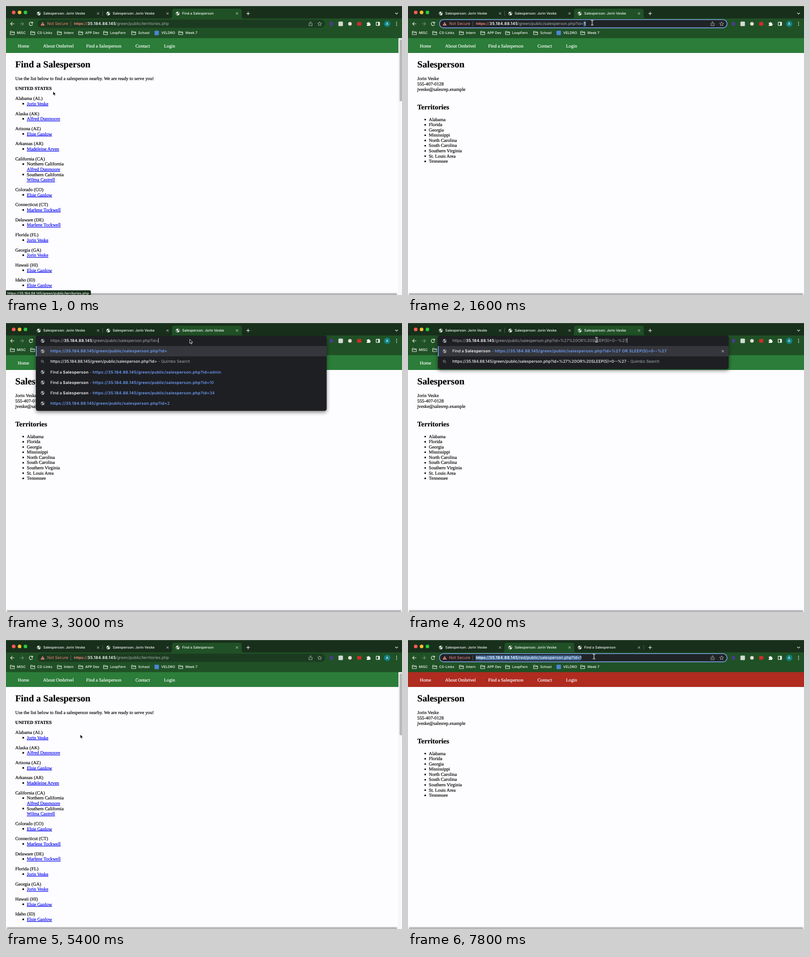
An HTML page for the animation above (8 s loop, 875 px wide and 640 px high).

```html
<!DOCTYPE html>
<html lang="en">
<head>
<meta charset="utf-8">
<title>Find a Salesperson</title>
<style>
html, body { margin: 0; width: 100%; height: 100%; overflow: hidden; background: #fdfcfe; }
svg { display: block; width: 875px; height: 640px; }
text { white-space: pre; text-rendering: geometricPrecision; }
.ui { font: 500 7.65px Inter, Roboto, sans-serif; fill: #f4f7f4; }
.url { font: 400 8.8px Inter, Roboto, sans-serif; fill: #a5ada8; letter-spacing: 0; }
.page { font: 10.3px "Liberation Serif", "Times New Roman", serif; fill: #000; stroke: #000; stroke-width: .2px; }
.h1 { font-size: 20.6px; font-weight: 700; }
.h2 { font-size: 15.4px; font-weight: 700; }
.bold { font-weight: 700; }
.nav { fill: #fff; stroke: #fff; }
.link { fill: #0000ee; stroke: #0000ee; text-decoration: underline; }
.white { fill: #f1f3f4; font-weight: 500; }
.strong { font-weight: 600; fill: #fff; letter-spacing: .34px; }
.hit { font-weight: 600; fill: #6f9ef8; letter-spacing: .34px; }
.blue { fill: #6f9ef8; }
.warn { fill: #ee8378; }
.line { fill: none; stroke: #e9efe9; stroke-width: 1.2; }
.drop { filter: drop-shadow(0 3px 4px rgba(0, 0, 0, .5)); }
</style>
</head>
<body>
<svg id="stage" viewBox="0 0 875 640"></svg>
<script>
const LOOP = 8000, STEP = 200, LINE = 11.57, GAP = 10.27;
const stage = document.getElementById("stage");

const HOST = "35.184.88.145";
const LIST = "/green/public/territories.php";
const PERSON = "/green/public/salesperson.php?id=";
const ATTACK = "%27%20OR%20SLEEP(5)=0--%27";

const JORIN = "Jorin Veske", ALFRED = "Alfred Dunmoore", ELSIE = "Elsie Ganlow";
const MADELEINE = "Madeleine Arven", WILMA = "Wilma Castrell", MARLENE = "Marlene Tockwell";
const STATES = [
  ["Alabama (AL)", JORIN], ["Alaska (AK)", ALFRED], ["Arizona (AZ)", ELSIE],
  ["Arkansas (AR)", MADELEINE],
  ["California (CA)", "-Northern California", ALFRED, "-Southern California", WILMA],
  ["Colorado (CO)", ELSIE], ["Connecticut (CT)", MARLENE], ["Delaware (DE)", MARLENE],
  ["Florida (FL)", JORIN], ["Georgia (GA)", JORIN], ["Hawaii (HI)", ELSIE], ["Idaho (ID)", ELSIE]
];
const TERRITORIES = ["Alabama", "Florida", "Georgia", "Mississippi", "North Carolina",
  "South Carolina", "Southern Virginia", "St. Louis Area", "Tennessee"];

// time, x, y, shape
const POINTER = [
  [0, 104, 189, "arrow"], [200, 99, 198, "arrow"], [400, 80, 215, "hand"], [800, 78, 216, "arrow"],
  [1000, 200, 140, "arrow"], [1200, 370, 56, "arrow"], [1400, 405, 37, "beam"], [1600, 407, 37, "beam"],
  [2200, 406, 36, "arrow"], [3600, 406, 36, "arrow"], [3800, 416.5, 37, "beam"], [4600, 416.5, 37, "beam"],
  [4800, 405, 50, "arrow"], [5400, 164, 209, "arrow"], [6000, 164, 209, "arrow"],
  [6600, 310, 30, "arrow"], [6800, 328, 15, "arrow"], [7200, 328, 15, "arrow"],
  [7400, 370, 29, "arrow"], [7600, 408, 37, "beam"], [7800, 411, 36.5, "beam"]
];

const text = (x, y, s, cls) => `<text x="${x}" y="${y}" class="${cls}">${s}</text>`;
const span = (s, cls) => `<tspan class="${cls}">${s}</tspan>`;
const rect = (x, y, w, h, fill, r = 0, more = "") =>
  `<rect x="${x}" y="${y}" width="${w}" height="${h}" rx="${r}" fill="${fill}" ${more}/>`;
const dot = (x, y, r, fill) => `<circle cx="${x}" cy="${y}" r="${r}" fill="${fill}"/>`;
const line = (d, more = "") => `<path class="line" d="${d}" ${more}/>`;
const at = (x, y, s) => `<g transform="translate(${x} ${y})">${s}</g>`;
const cross = (x, y) => at(x, y, line("M-2.4-2.4 2.4 2.4M2.4-2.4-2.4 2.4", 'style="stroke-width:1;stroke:#d6dcd8"'));

const globe = (x, y, fill = "#eef1ee", land = "#1b3a20") => at(x, y,
  dot(0, 0, 4.2, fill) +
  `<path fill="${land}" d="M-3.4-1.2Q-2 .1-.3.2V1.6Q-1.6 1.7-1.2 3.3-3.6 2-3.4-1.2M0-3.3Q.2-1.4 1.6-1.2L1.4.2 3.3 1Q3.9-1.8 1.8-3Z"/>`);
const lens = (x, y) => at(x, y,
  line("M1 1 3.4 3.4M1.5-.9A2.4 2.4 0 1 1-3.3-.9 2.4 2.4 0 1 1 1.5-.9", 'style="stroke:#a4a9ae;stroke-width:1"'));
const folder = x => line(`M${x - 4.6} 56H${x - 1}L${x + .3} 57.3H${x + 4.6}V63.4H${x - 4.6}ZM${x - 4.6} 58.9H${x + 4.6}`,
  'style="stroke-width:1"');

function state(t) {
  const onList = t < 800 || (t >= 4800 && t < 7000);
  const red = t >= 7000;
  return {
    t, onList, red,
    open: t >= 2000 && t < 4400,
    focus: (t >= 1400 && t < 2000) || t >= 7600,
    rows: t < 2200 ? 10 : t < 3200 ? 6 : 2,
    query: t < 3200 ? "" : ATTACK,
    path: red ? "/red/public/salesperson.php?id=1"
      : onList ? LIST : PERSON + (t >= 4400 ? ATTACK : "1"),
    hover: t >= 6700 && !red
  };
}

function listPage() {
  let y = 208.2, out = text(20.5, 136, "Find a Salesperson", "page h1") +
    text(20.5, 164.4, "Use the list below to find a salesperson nearby. We are ready to serve you!", "page") +
    text(20.5, 186.4, "UNITED STATES", "page bold");
  for (const [name, ...items] of STATES) {
    out += text(20.5, y, name, "page");
    items.forEach((item, i) => {
      y += LINE;
      const area = item[0] === "-";
      if (area || i === 0) out += rect(36.4, y - 5, 3.4, 3.4, "#000");
      out += text(46, y, area ? item.slice(1) : item, area ? "page" : "page link");
    });
    y += LINE + GAP;
  }
  return out;
}

function personPage() {
  const info = [JORIN, "555-407-0128", "jveske@salesrep.example"];
  return text(20.5, 136, "Salesperson", "page h1") +
    info.map((s, i) => text(20.5, 164.4 + i * LINE, s, "page")).join("") +
    text(20.5, 229, "Territories", "page h2") +
    TERRITORIES.map((s, i) => {
      const y = 254.6 + i * LINE;
      return dot(38, y - 3, 1.8, "#000") + text(46, y, s, "page");
    }).join("");
}

function page(s) {
  const links = [[26, "Home"], [82, "About Ombrivel"], [177, "Find a Salesperson"], [286, "Contact"], [349, "Login"]];
  let out = rect(0, 71, 875, 569, "#fdfcfe") +
    rect(0, 71, s.onList ? 867.5 : 875, 33, s.red ? "#b02b20" : "#2b7d39") +
    links.map(([x, name]) => text(x, 92, name, "page nav")).join("") +
    (s.onList ? listPage() : personPage()) +
    rect(0, 633, 875, 7, "#f7f6f8") + rect(2, 636, s.onList ? 862 : 871, 5, "#b6b5b7", 2);
  if (s.onList) out += rect(867.5, 71, 7.5, 569, "#f8f7f9") + rect(867.3, 71, .6, 562, "#e2e1e3") +
    rect(869.6, 74, 5.6, 137, "#b9b8ba", 2.6);
  return out;
}

function tabs(s) {
  const active = s.red ? 1 : 2;
  const shape = (i, fill) => `<path fill="${fill}" d="M${54.5 + i * 153.7} 28q5 0 5-5V11q0-5 5-5h144q5 0 5 5v12q0 5 5 5z"/>`;
  let out = rect(0, 0, 875, 28, "#182f1b") + rect(0, 0, 875, 1, "#4a5c4c") +
    ["#fc5b57", "#febc2e", "#28c840"].map((c, i) => dot(17 + i * 13, 14.3, 4, c)).join("");
  if (s.hover) out += shape(1, "#1b3a20");
  out += shape(active, "#205126");
  for (let i = 0; i < 3; i++) {
    const x = 72.5 + i * 153.5;
    const title = i === 2 && (s.onList || s.red) ? "Find a Salesperson" : "Salesperson: " + JORIN;
    out += globe(x, 16.6) + text(x + 9.8, 19.3, title, "ui") + cross(x + 131, 16.6);
  }
  if (active === 2 && !s.hover) out += rect(213, 11, .8, 11, "#5b705d");
  if (active === 1) out += rect(520.5, 11, .8, 11, "#5b705d");
  return out + line("M531.2 16.6h7.6M535 12.8v7.6") + line("M860 15l3 3 3-3");
}

function bookmarks() {
  const items = [[14, "MISC"], [59, "CS-Links"], [118, "Intern"], [165, "APP Dev"], [220, "LoopFern"],
    [282, "School"], [333, "VELDRO"], [386, "Week 7"]];
  return items.map(([x, name]) =>
    (name === "VELDRO" ? rect(x - 4.8, 54.8, 9.6, 9.6, "#4b86d4", 1) : folder(x)) +
    text(x + 10, 62.4, name, "ui")).join("");
}

function omnibox(s) {
  const picked = s.focus && s.red, split = s.focus && !s.red;
  let out = rect(69.5, 30.2, 635.5, 18.2, s.focus ? "#202326" : "#1b3b20", 9.1,
    s.focus ? 'stroke="#7fa8f2" stroke-width="1.6"' : "");
  if (picked) out += rect(149.5, 34, 232.5, 11, "#3f6796");
  if (split) out += rect(387.8, 34, 5.4, 11, "#3f6796");
  out += `<path d="M81 35.2l4.5 8h-9z" fill="#ee8378"/>` + rect(80.5, 38, 1, 2.6, "#26302a") + rect(80.5, 41.2, 1, 1, "#26302a") +
    text(91, 42.4, "Not Secure", "url warn") + rect(142.7, 34, .8, 11, "#6d7c6f") +
    text(150, 42.4, `<tspan text-decoration="line-through">https</tspan>://`, picked ? "url white" : "url warn") +
    text(180, 42.4, HOST, "url strong") +
    text(242.3, 42.4, split ? PERSON : s.path, picked ? "url white" : "url");
  if (split) out += text(388.5, 42.4, "1", "url white");
  const thin = 'style="stroke:#b9c4ba;stroke-width:.9"';
  return out + line("M671 38.2h-1.6v5.4h7v-5.4h-1.6M672.9 41v-6M671 36.6l1.9-1.9 1.9 1.9", thin) +
    line("M693 35.1l1.3 2.8 3.1.4-2.3 2.1.6 3-2.7-1.5-2.7 1.5.6-3-2.3-2.1 3.1-.4z", thin);
}

function dropdown(s) {
  const dark = "#1e1f23", grey = "#a9aeb2", full = "https://" + HOST + PERSON;
  const tails = ["admin", "10", "34", "2", "3", "5", "12", "7"];
  const found = "Find a " + span("Salesperson", "strong") + span(" - ", "url");
  const rows = [
    (s.query ? found : "") + span(full + s.query.replaceAll("%20", " "), "hit"),
    full + s.query + span(" - Quimbo Search", "url"),
    ...tails.map((id, i) => (i < 3 ? found : "") + span(full, "hit") + span(id, "blue"))
  ];
  let out = `<g class="drop">${rect(66, 28, 642.5, 27.9 + 23.1 * s.rows, dark, 4.5)}</g>` +
    rect(66, 51, 642.5, 22.9, "#35373c") + rect(66, 51, 1.8, 22.9, "#6f9ef8") +
    globe(81, 39.5, grey, dark) +
    text(98, 42.4, "https://" + span(HOST, "strong") + PERSON + s.query + `<tspan dx="-1" class="white">|</tspan>`, "url");
  for (let i = 0; i < s.rows; i++) {
    const y = 62.4 + i * 23.1;
    out += (i === 1 ? lens(81, y) : globe(81, y, grey, i ? dark : "#35373c")) + text(98, y + 2.9, rows[i], "url white");
  }
  return out + (s.query ? cross(695.7, 62.4) : "");
}

function toolbar(s) {
  const loading = s.t >= 4400 && s.t < 4800;
  let out = rect(0, 27.5, 875, 43.7, "#205126") +
    line("M18.4 39.5H10.4M14 35.7l-3.8 3.8 3.8 3.8") +
    line("M30.5 39.5h8M34.9 35.7l3.8 3.8-3.8 3.8", 'opacity=".42"') +
    (loading ? cross(55, 39.5) : line("M58 37A3.8 3.8 0 1 0 58.8 40.6M58.9 35v3.2h-3.2"));
  out += rect(715.5, 35.5, 7, 8, "#4b3a91", 1) + rect(734.5, 34.5, 10, 10, "#d4dad5", 1.5) +
    dot(760, 39.5, 4, "#e8dcd4") + rect(776, 35.5, 9, 8, "#d02c2c", 1.5) +
    `<path fill="#f2f5f2" d="M797 37h2.4a1.5 1.5 0 1 1 3 0h2v2.4a1.5 1.5 0 1 1 0 3V44h-7.4v-2.3a1.4 1.4 0 1 0 0-2.8z"/>` +
    rect(818, 36, 7.4, 7.2, "none", .5, 'stroke="#f2f5f2" stroke-width="1.3"') + rect(822.4, 36, 3, 7.2, "#f2f5f2") +
    dot(842.3, 39.6, 7, "#0f8283") + `<text x="842.3" y="42.2" class="ui" text-anchor="middle">A</text>` +
    [36, 39.5, 43].map(y => dot(863, y, 1, "#f2f5f2")).join("");
  return out + bookmarks() + (s.open ? "" : omnibox(s));
}

function status(s) {
  if (s.t >= 800) return "";
  const link = s.t >= 400;
  return `<path d="M0 629.8h${link ? 212 : 184.5}q3 0 3 3V640H0z" fill="#182f1b" stroke="#50634f" stroke-width=".6"/>` +
    text(3, 638.8, "https://" + HOST + (link ? PERSON + 1 : LIST), "ui");
}

function pointer(t) {
  let i = POINTER.length - 1;
  while (POINTER[i][0] > t) i--;
  const a = POINTER[i], b = POINTER[i + 1] || a;
  const k = b === a ? 0 : (t - a[0]) / (b[0] - a[0]);
  const mix = n => a[n] + (b[n] - a[n]) * k;
  const shapes = {
    arrow: `<path d="M0 0V9.3L2.1 7.3 3.5 10.5 5 9.8 3.6 6.8H6.5z" fill="#000" stroke="#fff" stroke-width=".9"/>`,
    hand: `<path d="M-1 0q1-1 2 0v3.5l4 1v3l-1 3h-4l-3.5-4q0-1.5 2.5 0z" fill="#fff" stroke="#000" stroke-width=".8"/>`,
    beam: ["#fff", "#222"].map((c, n) =>
      `<path d="M-2.7-5Q0-5 0-3.5 0-5 2.7-5M0-3.5V3.8M-2.7 5.2Q0 5.2 0 3.8 0 5.2 2.7 5.2M-1.3 1.8H1.3" fill="none" stroke="${c}" stroke-width="${n ? .7 : 1.8}"/>`).join("")
  };
  return at(mix(1), mix(2), shapes[a[3]]);
}

let shown = -1;
function draw(now) {
  const t = Math.floor(now % LOOP / STEP) * STEP;
  if (t !== shown) {
    shown = t;
    const s = state(t);
    stage.innerHTML = page(s) + tabs(s) + toolbar(s) + (s.open ? dropdown(s) : "") + status(s) + pointer(t);
  }
}

const start = performance.now();
function tick() {
  draw(performance.now() - start);
  requestAnimationFrame(tick);
}
tick();
</script>
</body>
</html>
```
